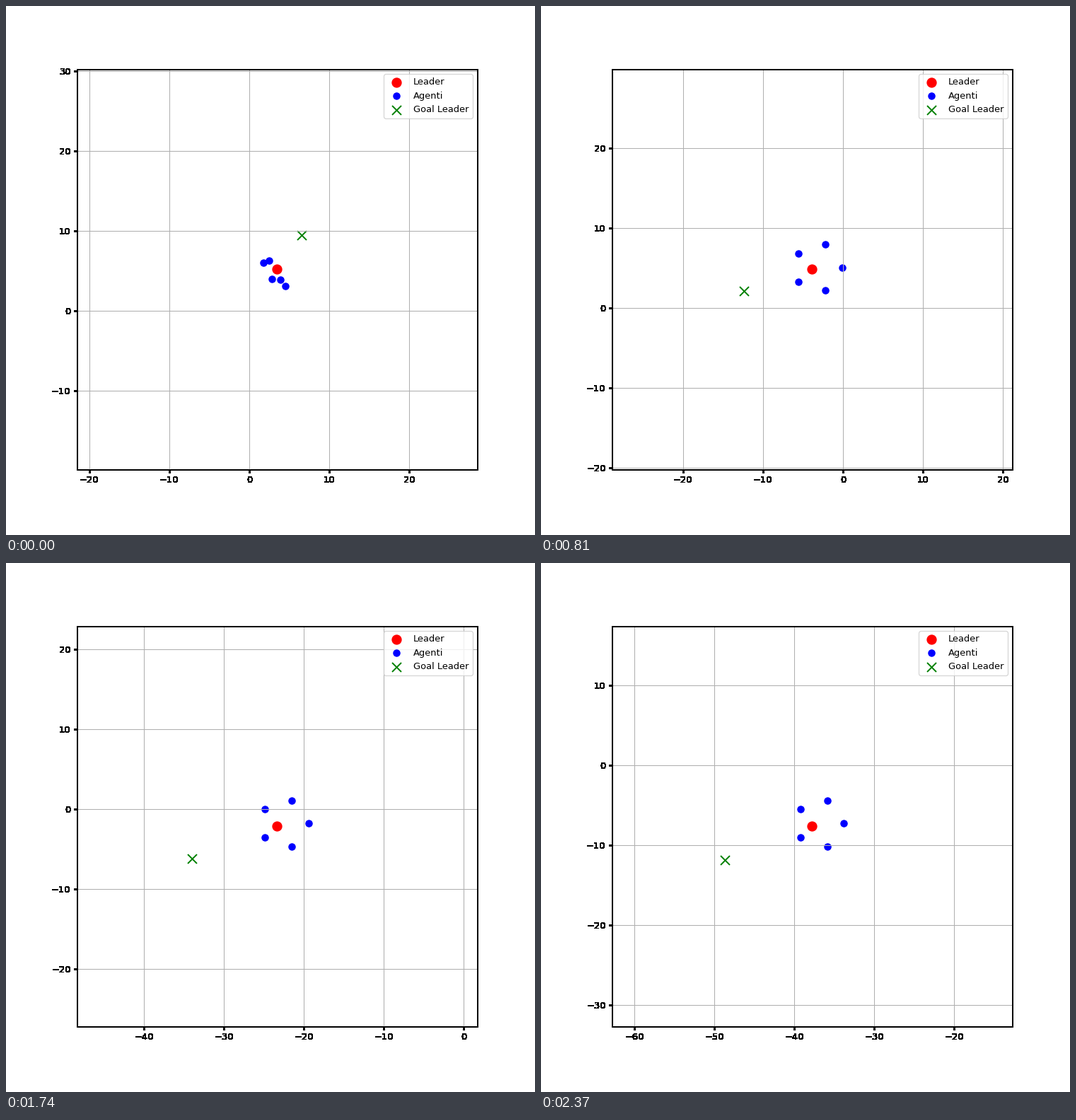
Animation, 748 px wide and 748 px high, one loop 2400 ms. Source, as a matplotlib script:

```python
import numpy as np
import matplotlib.pyplot as plt
from matplotlib.animation import FuncAnimation
from matplotlib.ticker import MultipleLocator

SIZE, DPI = 748, 93.5
FRAMES, INTERVAL = 80, 30
HALF_VIEW = 25
LEFT, BOTTOM, SIDE = 100.7, 655.0, 565.3

GOAL_START = np.array([6.55, 9.43])
GOAL_STEP = np.array([-0.6995, -0.2695])
LEADER_START = np.array([3.50, 5.16])
LEADER_GAIN = 0.0635
AGENT_GAIN = 0.722
RADIUS = 3.02

# Agents start near the leader, listed in the order of their formation slots.
AGENT_START = LEADER_START + np.array([
    [0.42, -1.31], [-0.99, 1.10], [-1.74, 0.85], [-0.65, -1.23], [1.00, -2.05],
])
angles = 2 * np.pi * np.arange(5) / 5
SLOTS = RADIUS * np.column_stack([np.cos(angles), np.sin(angles)])

# Closed form of two chained first-order pursuits.
LAG_END = GOAL_STEP / LEADER_GAIN
LAG_START = GOAL_START - LEADER_START - LAG_END
DRIFT_END = -GOAL_STEP / AGENT_GAIN
DRIFT_SLOW = -LEADER_GAIN * LAG_START / (AGENT_GAIN - LEADER_GAIN)
DRIFT_FAST = AGENT_START - LEADER_START - SLOTS - DRIFT_END - DRIFT_SLOW


def positions(n):
    slow = np.exp(-LEADER_GAIN * n)
    fast = np.exp(-AGENT_GAIN * n)
    goal = GOAL_START + GOAL_STEP * n
    leader = goal - LAG_END - LAG_START * slow
    drift = DRIFT_END + DRIFT_SLOW * slow + DRIFT_FAST * fast
    return goal, leader, leader + SLOTS + drift


def harden(image, dpi):
    """Turn every touched pixel solid black, without soft edges."""
    solid = np.zeros_like(image)
    solid[..., 3] = image[..., 3] > 0
    return solid, 0, 0


rect = [LEFT / SIZE, 1 - BOTTOM / SIZE, SIDE / SIZE, SIDE / SIZE]
fig = plt.figure(figsize=(SIZE / DPI, SIZE / DPI), dpi=DPI)

# Hard-edged ticks, labels and frame lie under the plot area.
scale = fig.add_axes(rect, zorder=0)
for axis in (scale.xaxis, scale.yaxis):
    axis.set_major_locator(MultipleLocator(10))
for part in (scale.xaxis, scale.yaxis, *scale.spines.values()):
    part.set_agg_filter(harden)

ax = fig.add_axes(rect, sharex=scale, sharey=scale, zorder=1)
ax.tick_params(length=0, labelbottom=False, labelleft=False)
ax.grid(True)

leader_dot = ax.scatter([], [], s=100, color="red", label="Leader")
agent_dots = ax.scatter([], [], s=50, color="blue", label="Agenti")
goal_mark = ax.scatter([], [], s=100, color="green", marker="x",
                       label="Goal Leader")
ax.legend(loc="upper right")


def update(n):
    goal, leader, agents = positions(n)
    goal_mark.set_offsets([goal])
    leader_dot.set_offsets([leader])
    agent_dots.set_offsets(agents)
    x, y = leader
    ax.set_xlim(x - HALF_VIEW, x + HALF_VIEW)
    ax.set_ylim(y - HALF_VIEW, y + HALF_VIEW)
    return leader_dot, agent_dots, goal_mark


anim = FuncAnimation(fig, update, frames=FRAMES, interval=INTERVAL,
                     repeat=True, repeat_delay=0, blit=False)
plt.show()
```
